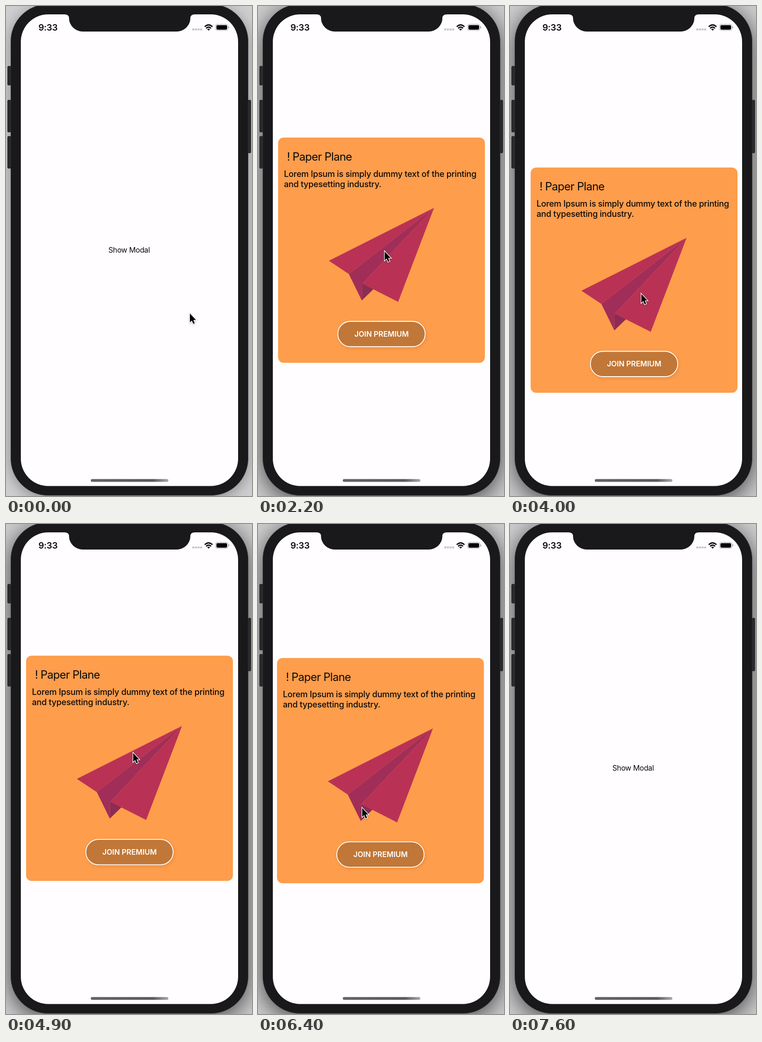
Animation, 531 px wide and 1055 px high, one loop 8000 ms. Source, as an HTML page:

```html
<!DOCTYPE html>
<html lang="en">
<head>
<meta charset="utf-8">
<title>Draggable modal</title>
<style>
  html, body { margin: 0; width: 100%; height: 100%; overflow: hidden; background: #cfced0; }
  .stage { position: absolute; inset: 0; overflow: hidden; }
  .phone {
    position: absolute; left: 10px; top: -4px; width: 513px; height: 1058px; box-sizing: border-box;
    border: 1px solid #38373a; border-radius: 80px; background: #19181a;
    box-shadow: 0 6px 30px rgba(0, 0, 0, .34);
  }
  .active .phone { box-shadow: 0 10px 50px rgba(0, 0, 0, .68); }
  svg { position: absolute; left: 0; top: 0; display: block; }
  text { font-family: Inter, Roboto, sans-serif; fill: #0b0a0b; }
  .clock { font-size: 19px; font-weight: 600; letter-spacing: -.3px; }
  .label { font-size: 15.9px; letter-spacing: -.32px; text-anchor: middle; }
  .title { font-size: 24px; letter-spacing: -.72px; }
  .copy { font-size: 18.1px; font-weight: 500; letter-spacing: -.22px; }
  .join { font-size: 15.9px; font-weight: 600; text-anchor: middle; fill: #fff; }
  .pill { fill: #c07738; stroke: #fff; stroke-width: 1.8; filter: drop-shadow(2px 3px 3px rgba(90, 40, 0, .12)); }
  .cursor { filter: drop-shadow(0 1.5px 1.5px rgba(0, 0, 0, .3)); }
</style>
</head>
<body>
<div class="stage" id="stage">
  <div class="phone"></div>
  <svg width="531" height="1055" viewBox="0 0 531 1055">
    <defs>
      <clipPath id="screen"><rect x="32" y="18" width="469" height="1015.5" rx="59"/></clipPath>
      <linearGradient id="bar">
        <stop offset="0" stop-color="#636264"/>
        <stop offset=".8" stop-color="#5a595b"/>
        <stop offset="1" stop-color="#a9a8aa"/>
      </linearGradient>
    </defs>

    <g fill="#2a292c">
      <rect x="3" y="129" width="8" height="42" rx="3"/>
      <rect x="3" y="202" width="8" height="70" rx="3"/>
      <rect x="3" y="280" width="8" height="70" rx="3"/>
      <rect x="522" y="202" width="7" height="115" rx="3"/>
    </g>

    <g clip-path="url(#screen)">
      <rect x="32" y="18" width="469" height="1016" fill="#fffdff"/>
      <text class="label" x="265.7" y="531">Show Modal</text>

      <g id="card">
        <rect x="43.3" y="283.2" width="446.5" height="485" rx="12" fill="#fe9d4b"/>
        <text class="title" x="62.5" y="333">!</text>
        <text class="title" x="74.5" y="333">Paper Plane</text>
        <text class="copy" x="56" y="368">Lorem Ipsum is simply dummy text of the printing</text>
        <text class="copy" x="56" y="389.7">and typesetting industry.</text>
        <path fill="#8b2c54" d="M225 597L224 634L250 609z"/>
        <path fill="#a02e58" d="M380 434.5L196 577L224 634L225 598z"/>
        <path fill="#b93255" d="M196 577L153 548.5L380 434.5zM225 598L302.5 637L380 434.5z"/>
        <rect class="pill" x="172.3" y="679" width="188.5" height="54.5" rx="27.2"/>
        <text class="join" x="266.7" y="712">JOIN PREMIUM</text>
      </g>

      <rect x="183" y="1018.5" width="167.5" height="6" rx="3" fill="url(#bar)"/>
    </g>

    <path fill="#19181a" d="M126 15V18Q136 18 136 26A30 29 0 0 0 166 55H368A30 29 0 0 0 398 26Q398 18 408 18V15z"/>

    <text class="clock" x="70" y="53">9:33</text>
    <path d="M402 50.5H423.5" stroke="#c3c2c5" stroke-width="4.2" stroke-dasharray="4.3 1.4"/>
    <g fill="none" stroke="#000" stroke-width="2.7">
      <path d="M429 44.6Q437.3 36.6 445.6 44.6"/>
      <path d="M432 47.9Q437.3 43 442.6 47.9"/>
    </g>
    <path d="M434.3 50Q437.3 47.4 440.3 50L437.3 53z"/>
    <rect x="452.3" y="39.3" width="26.7" height="13.4" rx="4" fill="none" stroke="#a3a2a4"/>
    <rect x="454.2" y="41.2" width="23" height="9.7" rx="2.4"/>
    <path d="M480 43.6q2 .6 2 2.4t-2 2.4z" fill="#a3a2a4"/>

    <g id="cursor">
      <path class="cursor" transform="scale(.91)" stroke="#fff" stroke-width="2.8" paint-order="stroke"
        d="M0 0V21L4.7 16.7L8 24.5L11.4 23L8.1 15.4H14.3z"/>
    </g>
  </svg>
</div>
<script>
  const LOOP = 8000, STEP = 100;
  const FOCUS = 1600, SHOW = 1700, FADE = 500, GONE = 7600;
  const stage = document.getElementById('stage');
  const card = document.getElementById('card');
  const cursor = document.getElementById('cursor');

  // Pointer glides; those with a release time carry the card along
  const home = { x: 397, y: 662 };
  const glides = [
    { start: 100, end: 300, x: 232, y: 584 },
    { start: 400, end: 900, x: 273.5, y: 528.5 },
    { start: 2200, end: 3000, x: 281, y: 490 },
    { start: 3000, end: 3900, x: 283.5, y: 620, release: 3917 },
    { start: 4500, end: 4900, x: 274.5, y: 493 },
    { start: 5000, end: 5720, x: 225, y: 611.5, release: 5970 },
    { start: 6600, end: 7100, x: 292, y: 590 },
    { start: 7200, end: GONE, x: 48, y: 594, release: LOOP }
  ];

  const clamp = v => Math.max(0, Math.min(1, v));
  const smooth = k => k * k * (3 - 2 * k);

  // Underdamped return to rest: 1 at release, tends to 0
  function spring(ms) {
    const s = ms / 1000, damp = 6.5, freq = 13.7;
    return Math.exp(-damp * s) * (Math.cos(freq * s) + damp / freq * Math.sin(freq * s));
  }

  function pose(t) {
    let { x, y } = home, dx = 0, dy = 0;
    for (const g of glides) {
      if (t < g.start) break;
      const k = smooth(clamp((t - g.start) / (g.end - g.start)));
      const mx = (g.x - x) * k, my = (g.y - y) * k;
      if (g.release) {
        const pull = t > g.release ? spring(t - g.release) : 1;
        dx = mx * pull;
        dy = my * pull;
      }
      x += mx;
      y += my;
    }
    return { x, y, dx, dy };
  }

  const place = (el, x, y) =>
    el.setAttribute('transform', `translate(${x.toFixed(2)} ${y.toFixed(2)})`);

  function draw(t) {
    const { x, y, dx, dy } = pose(t);
    const gone = t >= GONE;
    stage.classList.toggle('active', t >= FOCUS);
    card.setAttribute('opacity', gone ? 0 : clamp((t - SHOW) / FADE));
    place(card, dx, dy);
    place(cursor, x, y);
    cursor.style.display = gone ? 'none' : '';
  }

  const start = performance.now();
  function tick() {
    const t = Math.max(0, performance.now() - start) % LOOP;
    draw(Math.floor((t + 1) / STEP) * STEP % LOOP);
    requestAnimationFrame(tick);
  }
  tick();
</script>
</body>
</html>
```
